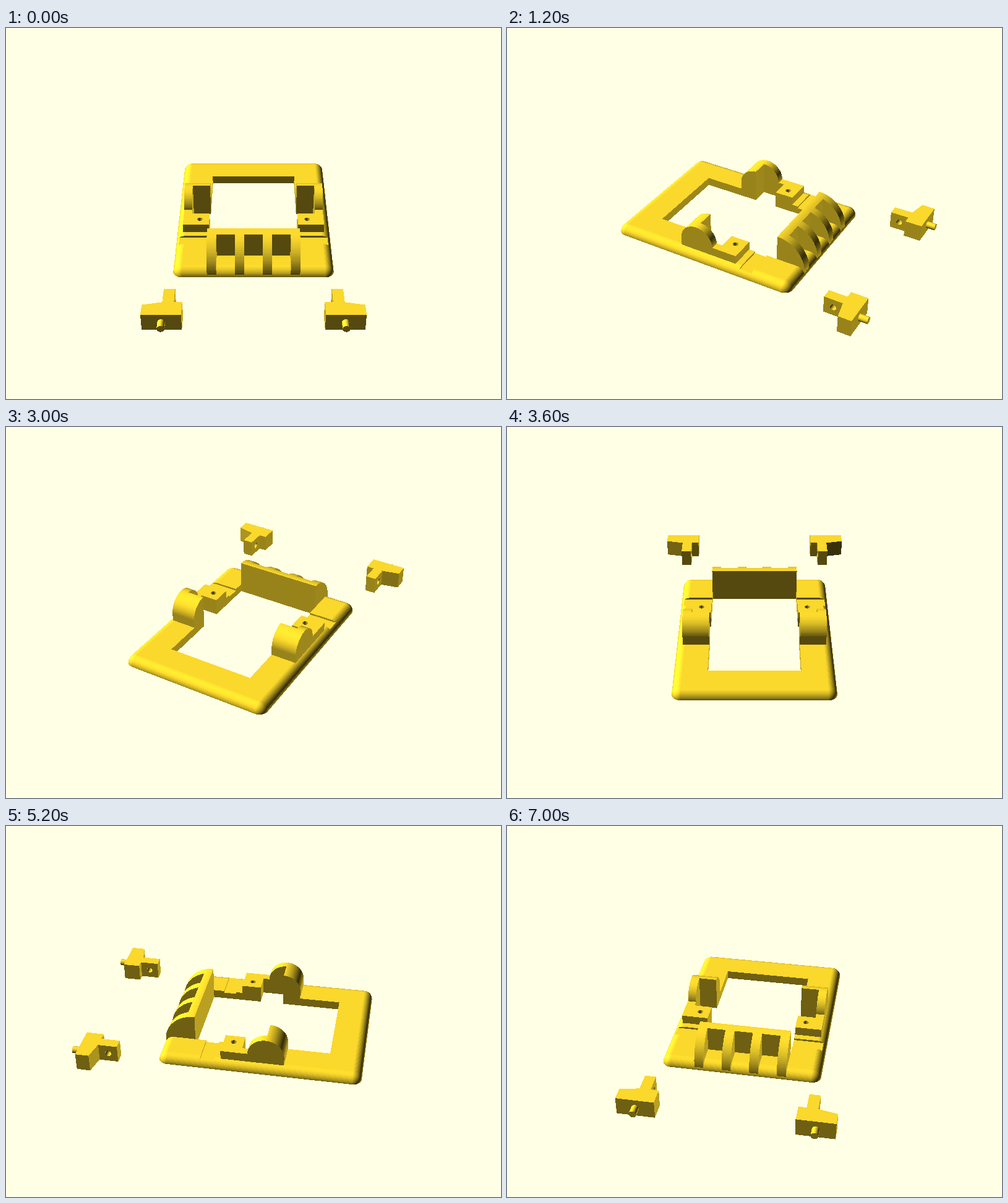
Animation of 800x600 px, one loop 7200 ms. Source, as an HTML page with a canvas:

```html
<!DOCTYPE html>
<html>
<head>
<meta charset="utf-8">
<style>
html, body { margin: 0; width: 100%; height: 100%; overflow: hidden; background: #ffffe5; }
canvas { display: block; }
</style>
</head>
<body>
<canvas id="stage" width="800" height="600"></canvas>
<script>
const W = 800, H = 600, STEP_MS = 200, STEPS = 36;
const DIST = H / 2 / Math.tan(Math.PI / 16);
const TILT = 55 * Math.PI / 180, SIN = Math.sin(TILT), COS = Math.cos(TILT);
const FACET = Math.PI / 50;
const COLOR = [249, 215, 44], BACK = [255, 255, 229];
const YZ = [1, 2], XZ = [0, 2], XY = [0, 1], XYZ = [0, 1, 2];

const ctx = document.getElementById("stage").getContext("2d");
const image = ctx.createImageData(W, H), data = image.data;
const depth = new Float32Array(W * H);

// A solid is a box, optionally limited by a round surface and a slanted plane.
const solid = (lo, hi, extra = {}) => ({ lo, hi, cuts: [], ...extra });
const round = (axes, c, r) => ({ axes, c, r });
const parts = [];
const add = (lo, hi, extra) => parts.push(solid(lo, hi, extra));

const UNIT = 14.16, FLOOR = -2 * UNIT, TOP = -UNIT, LEVEL = 0, PEAK = 2 * UNIT;
const INNER = 5 * UNIT, WALL = -80.5;

// Flat underneath, with a quarter-round rim.
function buildPlate() {
  const r = UNIT, x = 108.7, front = -115, back = 171.1;
  const cuts = [
    solid([-INNER, WALL, -99], [INNER, 132.7, 99]),
    solid([-7 * UNIT, 0, -99], [7 * UNIT, 38.5, 99]),
    solid([-200, -63, TOP - 3.2], [200, -42, 99])
  ];
  add([-x, front, FLOOR], [x, back, TOP], { cuts });
  for (const y of [front, back]) {
    add([-x, y - r, FLOOR], [x, y + r, TOP], { cuts, round: round(YZ, [0, y, FLOOR], r) });
    for (const s of [-x, x])
      add([s - r, y - r, FLOOR], [s + r, y + r, TOP], { round: round(XYZ, [s, y, FLOOR], r) });
  }
  for (const s of [-x, x])
    add([s - r, front, FLOOR], [s + r, back, TOP], { cuts, round: round(XZ, [s, 0, FLOOR], r) });
}

function buildComb() {
  const r = 48, bend = round(YZ, [0, WALL, PEAK - r], r);
  add([-INNER, WALL - 13, FLOOR], [INNER, WALL, PEAK], { round: bend });
  for (let i = 0; i < 4; i++) {
    const x = -INNER + i * 3 * UNIT;
    add([x, WALL - r, FLOOR], [x + UNIT, WALL, PEAK], { round: bend });
  }
}

function buildSide(side) {
  const put = (x0, x1, y0, y1, z0, z1, extra) =>
    add([side < 0 ? -x1 : x0, y0, z0], [side < 0 ? -x0 : x1, y1, z1], extra);

  // rounded hinge mount and drilled block
  const mid = 7 * UNIT, outer = 112.3, y = 38.5, r = PEAK;
  const bend = round(YZ, [0, y, LEVEL], r);
  put(mid, outer, -31.6, y + r, FLOOR, LEVEL);
  put(mid, outer, y - r, y + r, LEVEL, PEAK, { round: bend });
  put(INNER, mid, y, y + r, FLOOR, LEVEL);
  put(INNER, mid, y, y + r, LEVEL, PEAK, { round: bend });
  const bore = solid([-200, -40, -99], [200, 5, 99], { round: round(XY, [side * 86, -15.8, 0], 4.5) });
  put(INNER, mid, -31.6, 0, FLOOR, LEVEL, { cuts: [bore] });

  // loose arm: tapered head, drilled stem, pin
  const hole = solid([-200, -230, -99], [200, -180, 99], { round: round(YZ, [0, -205, TOP], 5) });
  put(101.5, 158.5, -247, -219.6, FLOOR, LEVEL,
    { plane: { n: [side * 0.2024, 0.9794, 0], d: -189.1 } });
  put(113.5, 130, -219.6, -190, FLOOR, LEVEL, { cuts: [hole] });
  put(124, 136, -247 - UNIT, -247, TOP - 6, TOP + 6, { round: round(XZ, [side * 130, 0, TOP], 5.5) });
}

buildPlate();
buildComb();
buildSide(-1);
buildSide(1);

const dot = (a, b) => a[0] * b[0] + a[1] * b[1] + a[2] * b[2];
const ROUND = 3, PLANE = 4;
const dir = [0, 0, 0], point = [0, 0, 0];
let right, up, toward, eye, light;
let near, far, nearFace, farFace;

// Finds where the current ray enters and leaves a solid.
function span(p) {
  near = -1e9;
  far = 1e9;
  for (let i = 0; i < 3; i++) {
    let a = (p.lo[i] - eye[i]) / dir[i], b = (p.hi[i] - eye[i]) / dir[i];
    if (a > b) { const t = a; a = b; b = t; }
    if (a > near) { near = a; nearFace = i; }
    if (b < far) { far = b; farFace = i; }
  }
  if (near >= far) return false;
  if (p.round) {
    const { axes, c, r } = p.round;
    let qa = 0, qb = 0, qc = -r * r;
    for (const i of axes) {
      const o = eye[i] - c[i];
      qa += dir[i] * dir[i];
      qb += o * dir[i];
      qc += o * o;
    }
    const disc = qb * qb - qa * qc;
    if (disc < 0) return false;
    const root = Math.sqrt(disc), a = (-qb - root) / qa, b = (-qb + root) / qa;
    if (a > near) { near = a; nearFace = ROUND; }
    if (b < far) { far = b; farFace = ROUND; }
  }
  if (p.plane) {
    const slope = dot(p.plane.n, dir), t = (p.plane.d - dot(p.plane.n, eye)) / slope;
    if (slope < 0 && t > near) { near = t; nearFace = PLANE; }
    if (slope > 0 && t < far) { far = t; farFace = PLANE; }
  }
  return near < far;
}

// Two opposite lights, so the sign of the normal does not matter.
function shade(p, face, t) {
  if (face < ROUND) return 0.2 + Math.abs(light[face]);
  if (face === PLANE) return 0.2 + Math.abs(dot(p.plane.n, light));
  const { axes, c, r } = p.round;
  for (const i of axes) point[i] = eye[i] + t * dir[i] - c[i];
  if (axes.length === 3) return 0.2 + Math.abs(dot(point, light)) / r;
  const [i, j] = axes;
  const angle = (Math.floor(Math.atan2(point[j], point[i]) / FACET) + 0.5) * FACET;
  return 0.2 + Math.abs(Math.cos(angle) * light[i] + Math.sin(angle) * light[j]);
}

function screenBox(p) {
  let x0 = W, x1 = 0, y0 = H, y1 = 0;
  for (let k = 0; k < 8; k++) {
    const v = [0, 1, 2].map(i => (k >> i & 1 ? p.hi : p.lo)[i]);
    const s = DIST / (DIST - dot(v, toward));
    const x = W / 2 + s * dot(v, right), y = H / 2 - s * dot(v, up);
    x0 = Math.min(x0, x); x1 = Math.max(x1, x);
    y0 = Math.min(y0, y); y1 = Math.max(y1, y);
  }
  return [Math.max(0, Math.floor(x0)), Math.min(W - 1, Math.ceil(x1)),
          Math.max(0, Math.floor(y0)), Math.min(H - 1, Math.ceil(y1))];
}

function drawPart(part) {
  const [x0, x1, y0, y1] = screenBox(part);
  for (let y = y0; y <= y1; y++) for (let x = x0; x <= x1; x++) {
    const u = x + 0.5 - W / 2, v = H / 2 - y - 0.5;
    for (let i = 0; i < 3; i++) dir[i] = u * right[i] + v * up[i] - DIST * toward[i];
    if (!span(part)) continue;
    let t = near, face = nearFace, surface = part;
    const end = far, pixel = y * W + x;
    // Skip through every cut that contains the hit point.
    for (let moved = true; moved && t < end;) {
      moved = false;
      for (const cut of part.cuts) {
        if (span(cut) && near <= t && far > t) {
          t = far; face = farFace; surface = cut; moved = true;
        }
      }
    }
    if (t >= end || t >= depth[pixel]) continue;
    depth[pixel] = t;
    const level = shade(surface, face, t);
    for (let i = 0; i < 3; i++) data[pixel * 4 + i] = COLOR[i] * level;
  }
}

function render(step) {
  const angle = step / STEPS * 2 * Math.PI, s = Math.sin(angle), c = Math.cos(angle);
  right = [c, -s, 0];
  up = [COS * s, COS * c, SIN];
  toward = [-SIN * s, -SIN * c, COS];
  eye = toward.map(n => n * DIST);
  light = [0, 1, 2].map(i => (up[i] + toward[i] - right[i]) / Math.sqrt(3));
  depth.fill(1e9);
  for (let i = 0; i < data.length; i += 4) {
    data[i] = BACK[0]; data[i + 1] = BACK[1]; data[i + 2] = BACK[2]; data[i + 3] = 255;
  }
  parts.forEach(drawPart);
  ctx.putImageData(image, 0, 0);
}

let shown = -1;
function tick() {
  const step = Math.floor(performance.now() / STEP_MS) % STEPS;
  if (step !== shown) render(shown = step);
  requestAnimationFrame(tick);
}
tick();
</script>
</body>
</html>
```
